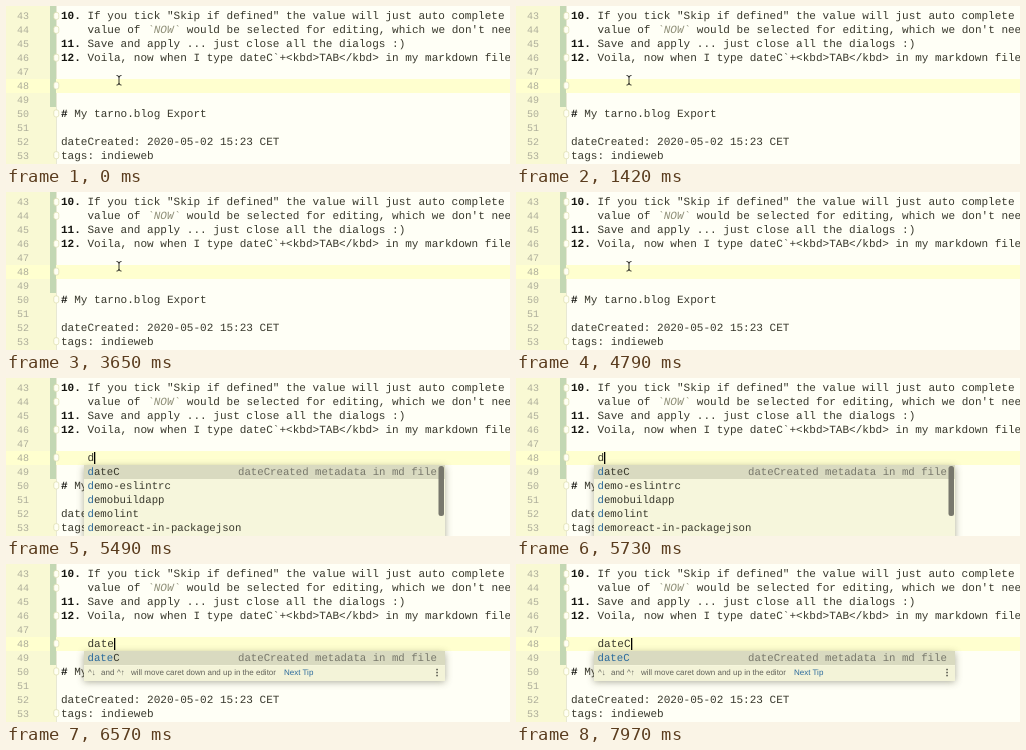
An HTML page with a canvas for the animation above (8 s loop, 504 by 158 pixels).

```html
<!DOCTYPE html>
<html lang="en">
<head>
<meta charset="utf-8">
<title>Editor live template</title>
<style>
  html, body { margin: 0; width: 100%; height: 100%; overflow: hidden; background: #fffff6; }
  canvas { display: block; width: 504px; height: 158px; }
</style>
</head>
<body>
<canvas id="stage"></canvas>
<script>
const W = 504, H = 158, LOOP = 8000;
const canvas = document.getElementById('stage');
const ctx = canvas.getContext('2d');
const dpr = window.devicePixelRatio || 1;
canvas.width = W * dpr;
canvas.height = H * dpr;
ctx.scale(dpr, dpr);

const MONO = '"Liberation Mono", monospace';
const SANS = '"Liberation Sans", sans-serif';
const CODE = '11.04px ' + MONO;
const BOLD = 'bold ' + CODE;
const POPUP = '10.7px ' + MONO;
const TIP = '8px ' + SANS;
const INK = '#38382c', STRONG = '#151510', BLUE = '#2b6a9c';
const LEFT = 55, PITCH = 13.93, CHAR = 6.625, POP_CHAR = 6.42;

const lines = [
  ['10.', ' If you tick "Skip if defined" the value will just auto complete'],
  ['', '    value of `NOW` would be selected for editing, which we don\'t need'],
  ['11.', ' Save and apply ... just close all the dialogs :)'],
  ['12.', ' Voila, now when I type dateC`+<kbd>TAB</kbd> in my markdown file'],
  ['', ''],
  ['', ''],
  ['', ''],
  ['#', ' My tarno.blog Export'],
  ['', ''],
  ['', 'dateCreated: 2020-05-02 15:23 CET'],
  ['', 'tags: indieweb']
];

// Typed text and popup contents, each from its start time on
const typing = [[0, ''], [5400, 'd'], [6250, 'da'], [6440, 'dat'], [6560, 'date'], [6820, 'dateC']];
const popups = [
  [0, null],
  [5450, { match: 'd', items: ['dateC', 'demo-eslintrc', 'demobuildapp', 'demolint', 'demoreact-in-packagejson'] }],
  [6290, { match: 'da', items: ['dateC', 'demobuildapp'], tip: true }],
  [6460, { match: 'dat', items: ['dateC'], tip: true }],
  [6560, { match: 'date', items: ['dateC'], tip: true }],
  [6820, { match: 'dateC', items: ['dateC'], tip: true }]
];
const CLICK = [2600, 3390];

const at = (track, t) => track.filter(step => step[0] <= t).pop()[1];
const baseline = row => 13.4 + row * PITCH;

function rect(x, y, w, h, color) {
  ctx.fillStyle = color;
  ctx.fillRect(x, y, w, h);
}

function text(str, x, y, font, color) {
  ctx.font = font;
  ctx.fillStyle = color;
  ctx.fillText(str, x, y);
}

function foldMark(row) {
  const y = baseline(row) - 7;
  ctx.beginPath();
  ctx.roundRect(47.8, y, 5, 7, 2);
  ctx.fillStyle = '#fffff4';
  ctx.fill();
  ctx.strokeStyle = '#dcdcae';
  ctx.lineWidth = 0.7;
  ctx.stroke();
}

function drawEditor() {
  rect(0, 0, W, H, '#fffff6');
  rect(0, 0, 50, H, '#f9f9d4');
  rect(50, 0, 0.7, H, '#dedec4');
  rect(0, 73, W, 14, '#ffffcf');
  rect(44, 0, 6, 101, '#c3d7b3');
  [0, 1, 3, 5, 7, 10].forEach(foldMark);
  lines.forEach(([mark, body], row) => {
    const y = baseline(row);
    text(String(43 + row), 11, y, '10px ' + MONO, '#adad9a');
    text(mark, LEFT, y, BOLD, STRONG);
    let x = LEFT + mark.length * CHAR;
    for (const part of body.split(/(`NOW`)/)) {
      const quoted = part === '`NOW`';
      text(part, x, y, quoted ? 'italic ' + CODE : CODE, quoted ? '#8f8f78' : INK);
      x += part.length * CHAR;
    }
  });
}

function drawMouse(clicked) {
  const x = 113, y = 74.3;
  ctx.strokeStyle = '#1c1c18';
  ctx.lineWidth = 0.9;
  ctx.beginPath();
  for (const s of [-1, 1]) {
    ctx.moveTo(x - 2.5, y + s * 4.8);
    ctx.quadraticCurveTo(x, y + s * 4.8, x, y + s * 3);
    ctx.quadraticCurveTo(x, y + s * 4.8, x + 2.5, y + s * 4.8);
  }
  ctx.moveTo(x, y - 4);
  ctx.lineTo(x, y + 4);
  ctx.stroke();
  if (!clicked) return;
  ctx.lineWidth = 1.2;
  ctx.beginPath();
  ctx.arc(x, 74, 11, 0, Math.PI * 2);
  ctx.stroke();
}

function drawItem(label, match, y) {
  const start = Math.max(0, label.indexOf(match));
  const end = start + match.length;
  const x = 81.5;
  text(label.slice(0, start), x, y, POPUP, INK);
  text(match, x + start * POP_CHAR, y, POPUP, BLUE);
  text(label.slice(end), x + end * POP_CHAR, y, POPUP, INK);
}

function drawTip(y) {
  rect(78, y, 361, 15, '#f3f3d8');
  const base = y + 9.2, gray = '#62625a';
  text('^↓', 82, base, TIP, gray);
  text('and', 95, base, TIP, gray);
  text('^↑', 111, base, TIP, gray);
  text('will move caret down and up in the editor', 125, base, TIP, gray);
  text('Next Tip', 278, base, TIP, BLUE);
  for (const dy of [-3, 0, 3]) rect(430.3, y + 5.8 + dy, 1.5, 1.5, '#4c4c44');
}

function drawPopup({ match, items, tip }) {
  const listH = items.length * 14 + 1;
  const h = tip ? listH + 14 : 80;
  ctx.save();
  ctx.shadowColor = 'rgba(70, 70, 45, 0.45)';
  ctx.shadowBlur = 7 * dpr;
  ctx.shadowOffsetY = 2 * dpr;
  rect(78, 87, 361, h, '#f6f6dc');
  ctx.restore();
  rect(78, 87, 361, 14, '#d9dac0');
  items.forEach((label, i) => drawItem(label, match, 97.4 + i * 14));
  text('dateCreated metadata in md file', 232, 97.4, POPUP, '#77776a');
  if (tip) {
    drawTip(87 + listH);
  } else {
    ctx.beginPath();
    ctx.roundRect(432.5, 88, 5.5, 50, 2.5);
    ctx.fillStyle = '#77776c';
    ctx.fill();
  }
}

function draw(t) {
  const typed = at(typing, t), popup = at(popups, t);
  ctx.textRendering = 'geometricPrecision';
  drawEditor();
  if (typed) {
    const x = LEFT + 4 * CHAR;
    text(typed, x, baseline(5), CODE, INK);
    rect(Math.round(x + typed.length * CHAR), 74, 1.3, 12, '#000');
  } else {
    drawMouse(t >= CLICK[0] && t < CLICK[1]);
  }
  if (popup) drawPopup(popup);
}

const start = performance.now();
function tick() {
  draw((performance.now() - start) % LOOP);
  requestAnimationFrame(tick);
}
tick();
</script>
</body>
</html>
```
